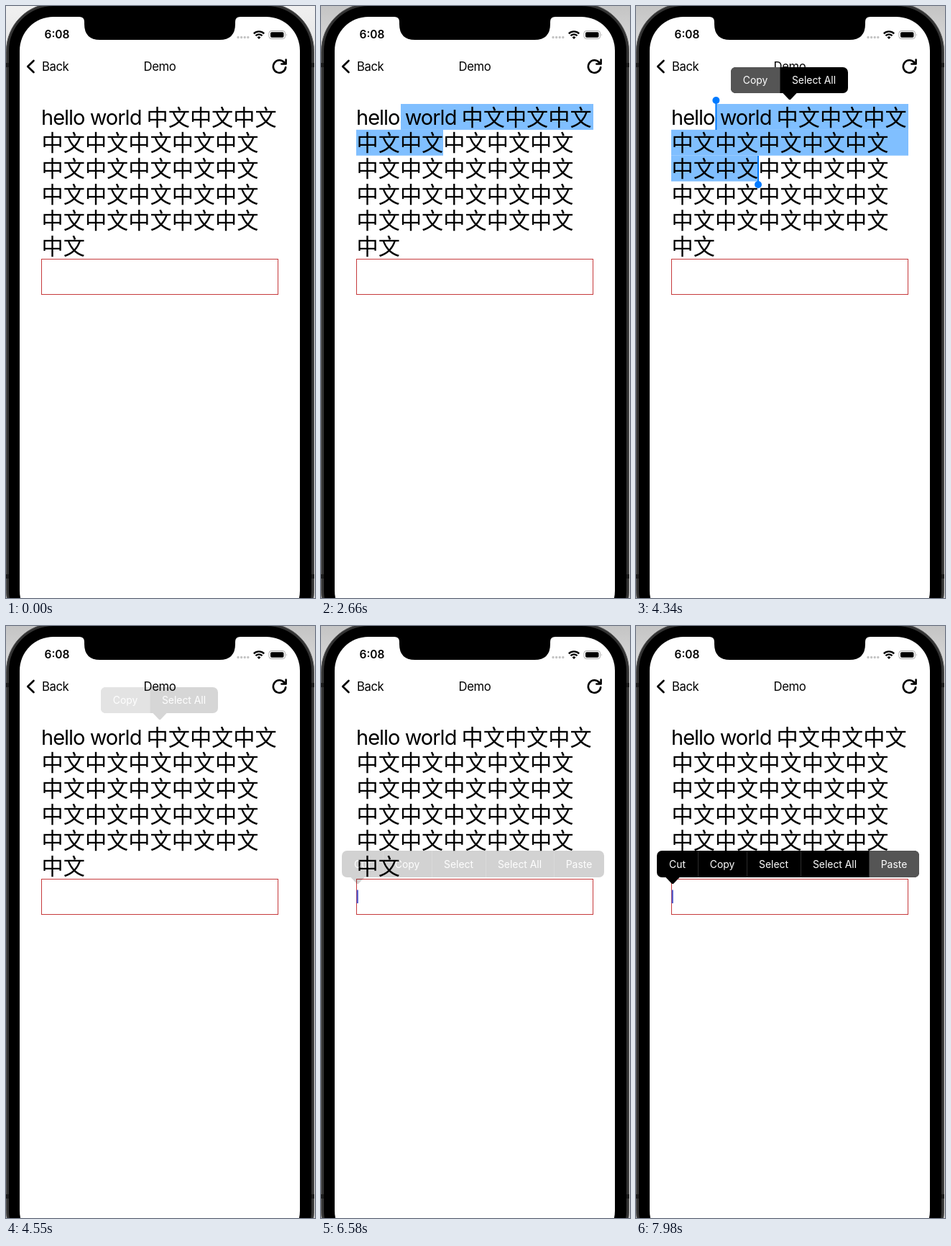
Animation, 430 px wide and 822 px high, one loop 8 s. Source, as an HTML page:

```html
<!DOCTYPE html>
<html lang="en">
<head>
<meta charset="utf-8">
<title>Text selection demo</title>
<style>
  html, body { margin: 0; width: 100%; height: 100%; overflow: hidden; }
  svg { display: block; width: 430px; height: 822px; font-family: Inter, "Open Sans", sans-serif; }
  .nav { font-size: 16.7px; letter-spacing: -.4px; }
  .latin { font-size: 29px; letter-spacing: -1px; }
  .cjk { font: 350 30.2px "Noto Sans CJK SC", "Noto Sans CJK", sans-serif; }
  .menu text { font-size: 13.9px; fill: #fff; text-anchor: middle; }
  .line { fill: none; stroke: #000; stroke-width: 2.6; stroke-linecap: round; stroke-linejoin: round; }
</style>
</head>
<body>
<svg viewBox="0 0 430 822">
  <defs>
    <linearGradient id="shade" x2="0" y2="1">
      <stop id="shadeTop" offset="0"/>
      <stop id="shadeEnd" offset=".08"/>
    </linearGradient>
  </defs>

  <!-- phone body -->
  <rect width="430" height="822" fill="url(#shade)"/>
  <rect x=".5" y="-3.5" width="428" height="882" rx="66" fill="#333" stroke="#555"/>
  <path d="M0 82h5M424 82h5M0 792h5M424 792h5" stroke="#1c1c1c" stroke-width="6"/>
  <rect x="4" width="421" height="874" rx="62"/>
  <rect x="19" y="15" width="390" height="844" rx="47" fill="#fff"/>
  <path d="M102 14V15Q109 15 109 22V25Q109 47 131 47H297Q319 47 319 25V22Q319 15 326 15V14Z"/>

  <!-- status bar -->
  <text x="53.5" y="45" font-size="15.5" font-weight="600">6:08</text>
  <path d="M323 43.5h16" stroke="#c4c4c4" stroke-width="3.4" stroke-linecap="round" stroke-dasharray="0 4.6"/>
  <g fill="none" stroke="#000" stroke-width="2.3">
    <path d="M344.8 38.3a10.4 10.4 0 0 1 14.4 0M347.4 41.3a6.6 6.6 0 0 1 9.2 0"/>
  </g>
  <path d="M352 46l-2.4-2.6a3.6 3.6 0 0 1 4.8 0z"/>
  <rect x="366" y="34.5" width="22.5" height="11" rx="3.2" fill="none" stroke="#aaa"/>
  <rect x="368" y="36.3" width="18.5" height="7.4" rx="1.8"/>
  <path d="M390 38.2q1.8 1.8 0 3.8z" fill="#aaa"/>

  <!-- navigation bar -->
  <path class="line" d="M38.5 76L30.2 84L38.5 92"/>
  <text class="nav" x="50" y="90">Back</text>
  <text class="nav" x="214" y="90" text-anchor="middle">Demo</text>
  <path class="line" d="M387.2 78.4A8.7 8.7 0 1 0 389.2 85M389.6 74.5V80.5H383.4"/>

  <g id="selection" fill="#80bfff"></g>
  <g id="copyText"></g>
  <g fill="#007aff">
    <g id="startHandle"><rect x="110.4" y="131" width="2" height="41"/><circle cx="111.4" cy="131" r="5"/></g>
    <g id="endHandle"><rect x="169" y="208" width="2" height="40"/><circle cx="170" cy="248" r="5"/></g>
  </g>

  <rect x="49.5" y="351.5" width="329" height="49" fill="none" stroke="#c63a3c"/>
  <rect id="cursor" x="49.6" y="366.5" width="2.2" height="18.5" fill="#4f58cc"/>
  <g id="copyMenu" class="menu"></g>
  <g id="editMenu" class="menu"></g>
</svg>

<script>
const LOOP = 8000, STEP = 70;
const $ = id => document.getElementById(id);
const fade = (id, value) => $(id).setAttribute("opacity", value);
const clamp = v => Math.min(1, Math.max(0, v));
const smooth = (t, from, to) => {
  const p = clamp((t - from) / (to - from));
  return p * p * (3 - 2 * p);
};

// Paragraph: mixed first line, then rows of repeated characters
const rows = [3, 5, 5, 5, 5, 1];
$("copyText").innerHTML = '<text class="latin" x="49" y="164.5">hello world</text>' +
  rows.map((n, i) =>
    `<text class="cjk" x="${i ? 49.5 : 195.5}" y="${165.5 + i * 35.8}">${"中文".repeat(n)}</text>`).join("");

// Popup bar with cells between the given edges and a pointer below
function buildMenu(id, top, height, edges, labels, tip, active) {
  const left = edges[0], right = edges[edges.length - 1], bottom = top + height;
  const cells = labels.map((label, i) => {
    const x = edges[i], w = edges[i + 1] - x;
    const rule = i ? `<path d="M${x + .5} ${top}v${height}" stroke="#2c2c2c"/>` : "";
    return `${rule}<text x="${x + w / 2}" y="${top + height / 2 + 5}">${label}</text>`;
  }).join("");
  const a = edges[active], b = edges[active + 1];
  const hit = active
    ? `M${a} ${top}H${b - 7}q7 0 7 7V${bottom - 7}q0 7 -7 7H${a}Z`
    : `M${b} ${top}H${a + 7}q-7 0 -7 7V${bottom - 7}q0 7 7 7H${b}Z`;
  $(id).innerHTML =
    `<rect x="${left}" y="${top}" width="${right - left}" height="${height}" rx="7"/>` +
    `<path d="M${tip - 10.5} ${bottom - 1}h21L${tip + 1} ${bottom + 9}h-2Z"/>` +
    `<path id="${id}Hit" d="${hit}" fill="#555"/><g id="${id}Labels">${cells}</g>`;
}
buildMenu("copyMenu", 85, 36, [132, 200, 295], ["Copy", "Select All"], 214, 0);
buildMenu("editMenu", 312, 37, [29, 86, 154, 229, 324, 394],
  ["Cut", "Copy", "Select", "Select All", "Paste"], 51, 4);

// Right edges of the highlighted part of each line
function selectedEnds(t) {
  if (t < 2310 || t >= 4410) return [];
  if (t < 2660) return [188 + 30.2 * Math.min(3, (t - 2310) / STEP)];
  return t < 2870 ? [379, 170] : [379, 379, 170];
}

function cursorOpacity(t) {
  if (t < 5250) return 0;
  if (t < 6300) return smooth(t, 5180, 5320) * (1 - smooth(t, 5950, 6090));
  return 1 - smooth(t, 7050, 7300) + smooth(t, 7420, 7560);
}

function draw(now) {
  const t = Math.floor(now % LOOP / STEP) * STEP;
  const dim = t >= 2030;
  $("shadeTop").setAttribute("stop-color", dim ? "#c4c4c4" : "#f0f0f0");
  $("shadeEnd").setAttribute("stop-color", dim ? "#dcdcdc" : "#e4e4e4");

  $("selection").innerHTML = selectedEnds(t).map((end, i) => {
    const x = i ? 49 : 111;
    return `<rect x="${x}" y="${136 + i * 35.8}" width="${end - x}" height="35.9"/>`;
  }).join("");
  fade("startHandle", +(t >= 3010 && t < 4410));
  fade("endHandle", +(t >= 2870 && t < 4410));

  const shown = smooth(t, 3115, 3500);
  fade("copyMenu", shown * (1 - smooth(t, 4340, 4620)));
  fade("copyMenuLabels", clamp(shown * 1.2));
  fade("copyMenuHit", +(t >= 4340));

  fade("cursor", cursorOpacity(t));
  fade("editMenu", smooth(t, 6530, 6720));
  fade("editMenuHit", +(t >= 7980));
}

const start = performance.now();
function tick() {
  draw(performance.now() - start);
  requestAnimationFrame(tick);
}
tick();
</script>
</body>
</html>
```
